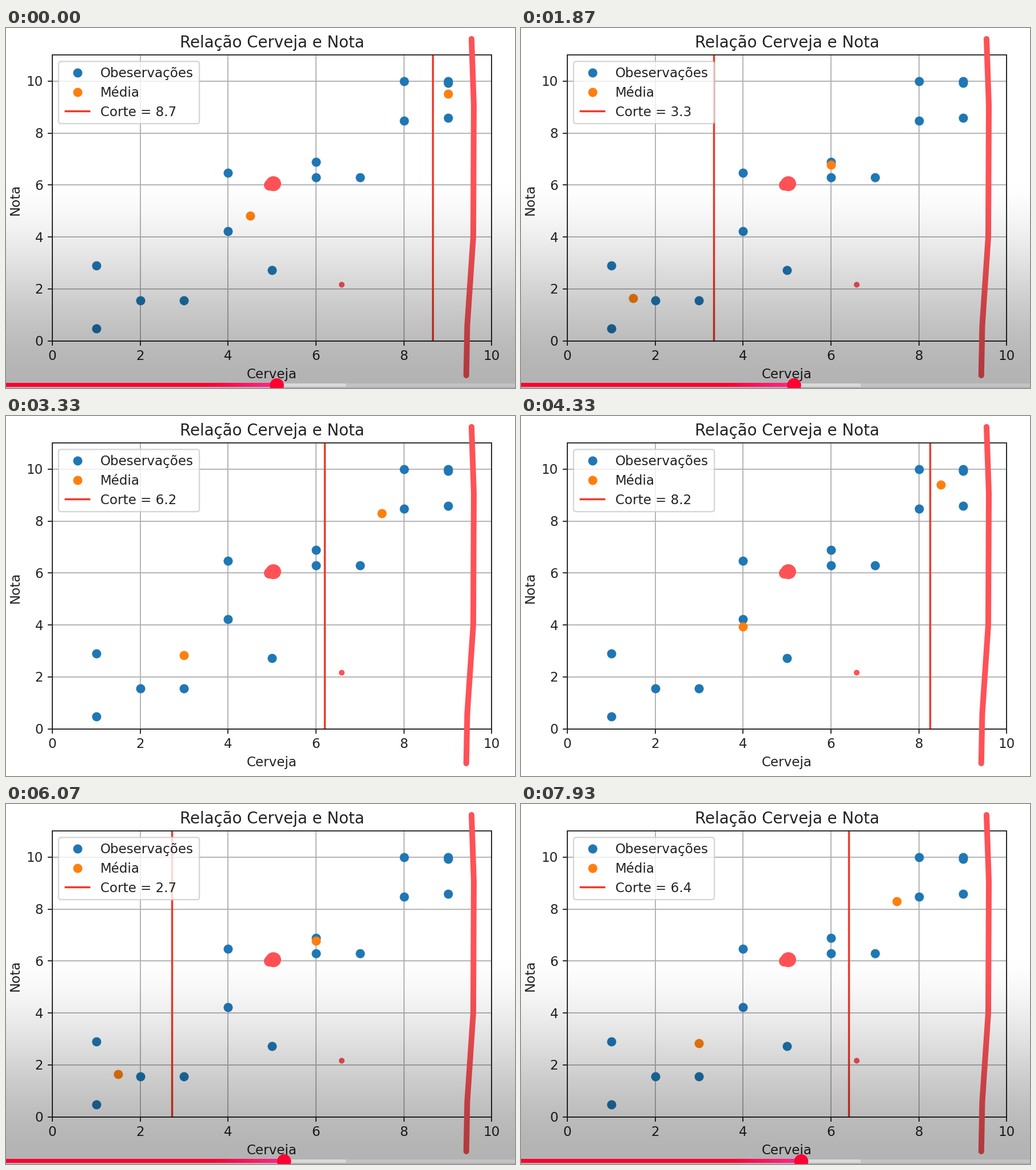
A matplotlib script for the animation above (8000 ms loop, 890 px wide and 629 px high).

```python
import numpy as np
import matplotlib.pyplot as plt
from matplotlib.animation import FuncAnimation
from matplotlib.patches import Circle, Ellipse, FancyBboxPatch, Rectangle

W, H, DPI = 890, 629, 100
FRAMES, LOOP = 120, 8000
PT = 72 / DPI                       # points per pixel
BLUE, ORANGE, CUT = "#1f77b4", "#ff7f0e", "#ee3a2a"
INK, PEN, PLAYED = "#222222", "#fe5257", "#ff0033"
LEFT, RIGHT, TOP, BOTTOM = 80.8, 849.4, 47.4, 546.8
BAR_TOP, BAR_BOTTOM, KNOB_Y = 620.5, 627, 624.3

# Grades seen for each number of beers, 1 to 9
grades = [[0.48, 2.91], [1.56], [1.56], [4.22, 6.47], [2.72],
          [6.29, 6.9], [6.29], [8.47, 10], [8.59, 9.93, 10]]
beer, grade = np.array([(n, g) for n, gs in enumerate(grades, 1) for g in gs]).T

plt.rcParams["font.family"] = "DejaVu Sans"
fig = plt.figure(figsize=(W / DPI, H / DPI), dpi=DPI, facecolor="white")
ax = fig.add_axes([0, 0, 1, 1])
ax.set_xlim(0, W)
ax.set_ylim(H, 0)
ax.axis("off")


def px(v):
    return LEFT + np.asarray(v) * (RIGHT - LEFT) / 10


def py(v):
    return BOTTOM - np.asarray(v) * (BOTTOM - TOP) / 11


def line(xs, ys, color, width, z, cap="butt"):
    return ax.plot(xs, ys, color=color, lw=width * PT, zorder=z,
                   solid_capstyle=cap, solid_joinstyle="round")[0]


def dots(xs, ys, color, z):
    return ax.plot(xs, ys, "o", color=color, ms=16 * PT, mew=0, zorder=z)[0]


def label(x, y, s, size=23, ha="center", z=4, **kw):
    return ax.text(x, y, s, fontsize=size * PT, color=INK, ha=ha,
                   va="baseline", zorder=z, **kw)


def bar(width, alpha, z):
    return ax.add_patch(Rectangle((0, BAR_TOP), width, BAR_BOTTOM - BAR_TOP,
                                  fc="white", lw=0, alpha=alpha, zorder=z))


def smooth(u):
    u = np.clip(u, 0, 1)
    return u * u * (3 - 2 * u)


# Chart frame, grid and labels
for v in range(0, 11, 2):
    x, y = px(v), py(v)
    line([x, x], [TOP, BOTTOM], "#b0b0b0", 1.84, 1)
    line([LEFT, RIGHT], [y, y], "#b0b0b0", 1.84, 1)
    line([x, x], [BOTTOM, BOTTOM + 8], INK, 1.84, 4)
    line([LEFT - 8, LEFT], [y, y], INK, 1.84, 4)
    label(x, 580.5, str(v))
    label(65, y + 8.5, str(v), ha="right")
ax.add_patch(Rectangle((LEFT, TOP), RIGHT - LEFT, BOTTOM - TOP, fill=False,
                       ec=INK, lw=1.84 * PT, zorder=4))
label(465, 34, "Relação Cerveja e Nota", 27.6)
label(464.5, 612, "Cerveja")
label(22.8, 299.5, "Nota", rotation=90, rotation_mode="anchor")

dots(px(beer), py(grade), BLUE, 2.5)
means = dots([], [], ORANGE, 2.6)
cut_line = line([0, 0], [TOP, BOTTOM], CUT, 3.45, 2.4)

# Legend
ax.add_patch(FancyBboxPatch((96.5, 63), 237, 99.5,
                            boxstyle="round,pad=4.6,rounding_size=4.6",
                            fc=(1, 1, 1, 0.8), ec=(0.8, 0.8, 0.8, 0.8),
                            lw=2.3 * PT, zorder=5))
dots([124.5], [78], BLUE, 6)
dots([124.5], [111.5], ORANGE, 6)
line([101.5, 147], [145, 145], CUT, 3.45, 6)
label(164.7, 86, "Obeservações", ha="left", z=6)
label(164.7, 119.5, "Média", ha="left", z=6)
cut_text = label(164.7, 153.5, "", ha="left", z=6)

# Pen marks
line([814, 818, 817, 806.5, 804.8], [19, 135, 365, 520, 607], PEN, 10, 7, "round")
ax.add_patch(Ellipse((467.5, 272), 27, 26, color=PEN, lw=0, zorder=7))
ax.add_patch(Circle((460.5, 274.5), 9.5, color=PEN, lw=0, zorder=7))
ax.add_patch(Circle((587, 448.5), 5, color=PEN, lw=0, zorder=7))

# Player overlay: shade, progress bar and knob
shade = np.zeros((H, 1, 4))
shade[:, 0, 3] = 0.3 * smooth((np.arange(H) - 245) / (H - 245))
shade_img = ax.imshow(shade, extent=(0, W, H, 0), aspect="auto", zorder=8,
                      interpolation="nearest")
mix = np.clip(np.linspace(-3, 1, 240), 0, 1)[None, :, None]
tint = (1 - mix) * [1, 0, 0.2, 1] + mix * [1, 0.16, 0.57, 1]
played = ax.imshow(tint, extent=(0, W, BAR_BOTTOM, BAR_TOP), aspect="auto",
                   zorder=10, interpolation="nearest")
ax.set_xlim(0, W)
ax.set_ylim(H, 0)
knob = ax.add_patch(Circle((0, KNOB_Y), 12.3, fc=PLAYED, lw=0, zorder=11))
overlay = [(shade_img, 1), (played, 1), (bar(W, 0.22, 9), 0.22),
           (bar(593.5, 0.38, 9.5), 0.38), (knob, 1)]


def draw(i):
    t = i * LOOP / FRAMES / 1000

    # The cut sweeps right in 45 steps, ten per second
    cut = 0.878 + 0.2047 * (int(38.5 + 10 * t) % 45)
    cut_line.set_xdata([px(cut)] * 2)
    cut_text.set_text(f"Corte = {cut:.1f}")

    low = beer < cut - 0.5
    groups = [g for g in (low, ~low) if g.any()]
    means.set_data([px((beer[g].min() + beer[g].max()) / 2) for g in groups],
                   [py(grade[g].mean()) for g in groups])

    pos = 473.6 + 2.08 * t
    knob.center = (pos, KNOB_Y)
    played.set_extent((0, pos, BAR_BOTTOM, BAR_TOP))

    # The overlay fades away around the middle of the loop
    fade = np.clip((abs(t - 3.8) - 0.75) / 0.2, 0, 1)
    for part, alpha in overlay:
        part.set_alpha(alpha * fade)
        part.set_visible(fade > 0)
    return []


anim = FuncAnimation(fig, draw, frames=FRAMES, interval=LOOP / FRAMES,
                     init_func=lambda: draw(0), repeat=True, repeat_delay=0)
plt.show()
```
